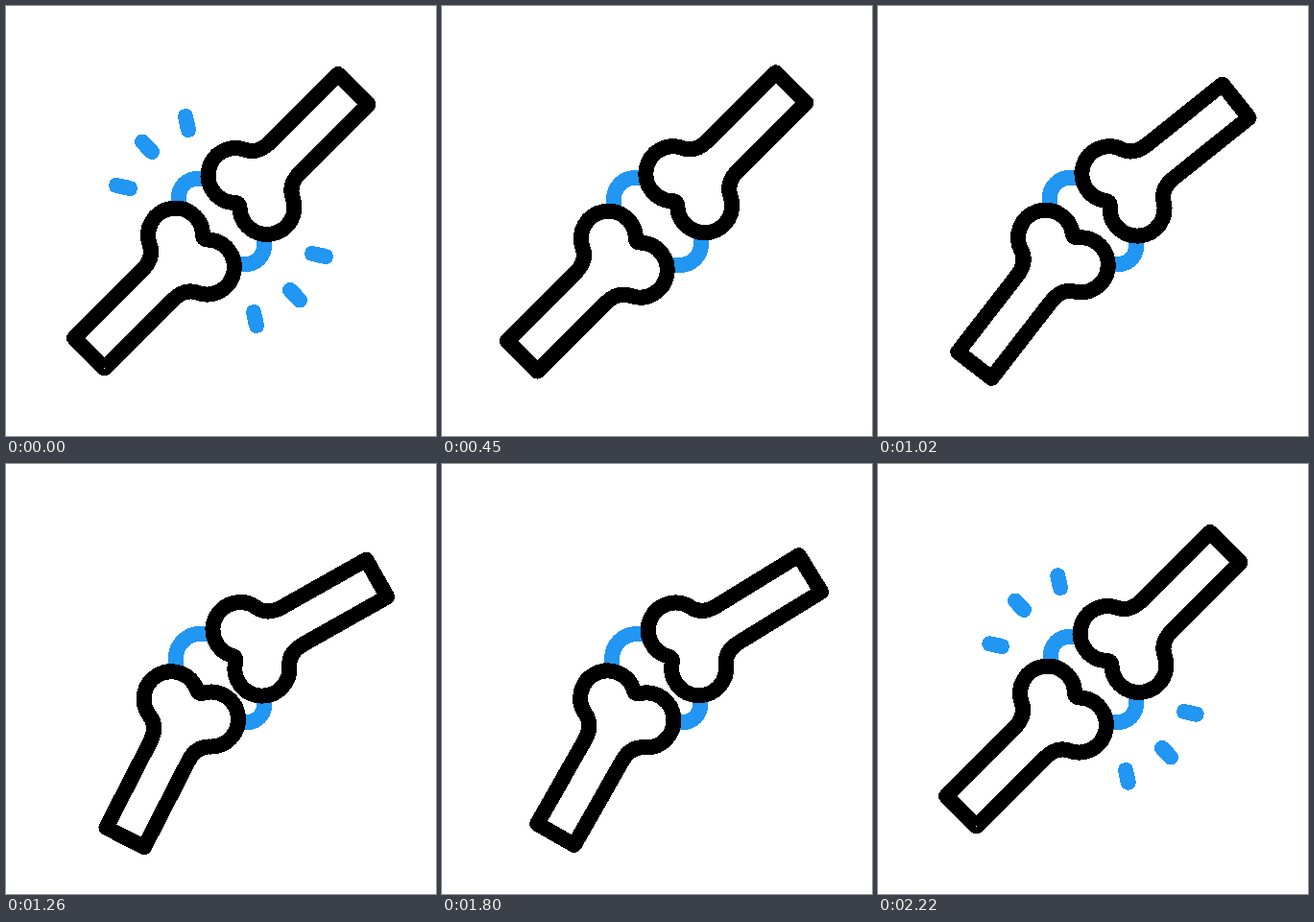
An HTML page that plays this animation: 448x448 px, repeating every 2250 ms.

```html
<!DOCTYPE html>
<html lang="en">
<head>
<meta charset="utf-8">
<title>Joint</title>
<style>
  html, body { margin: 0; width: 100%; height: 100%; overflow: hidden; background: #fff; }
  svg { display: block; width: 100%; height: 100%; shape-rendering: crispEdges; }
</style>
</head>
<body>
<svg viewBox="0 0 448 448">
  <defs>
    <path id="bone" d="M346 71 L275 142 C267 150 258.5 153.2 249 149.8 A28.5 28.5 0 1 0 238 205
      Q243.5 205 243.5 210.5 A28.5 28.5 0 1 0 298.7 199.5 C295.3 190 298.5 181.5 306.5 173.5 L377.5 102.5 Z"/>
    <path id="sparks"/>
  </defs>
  <g fill="none" stroke="#2196f3" stroke-width="16">
    <path id="cartilageA"/>
    <path id="cartilageB" transform="rotate(180 224.5 224.5)"/>
    <g stroke-linecap="round">
      <use href="#sparks"/>
      <use href="#sparks" transform="rotate(180 224 224)"/>
    </g>
  </g>
  <g fill="#fff" stroke="#000" stroke-width="16" stroke-linejoin="round">
    <use id="upper" href="#bone"/>
    <g transform="matrix(0 1 1 0 0 0)"><use id="lower" href="#bone"/></g>
  </g>
</svg>
<script>
const LOOP = 2250;
const SPARK_TIME = 150;
const SPARK_PEAKS = [0, 747, 1432, LOOP];
// Inner end, then outer end
const SPARKS = [[129, 190, 115, 187], [152, 152, 142, 141.5], [190, 129, 187, 115]];

const $ = id => document.getElementById(id);
const clamp = v => Math.min(1, Math.max(0, v));
const ease = p => (1 - Math.cos(Math.PI * clamp(p))) / 2;
const mix = (a, b, p) => a + (b - a) * p;

function track(keys, t) {
  const i = keys.findIndex(([time]) => time > t);
  if (i < 0) return keys[keys.length - 1][1];
  if (i === 0) return keys[0][1];
  const [t0, a] = keys[i - 1], [t1, b] = keys[i];
  return mix(a, b, ease((t - t0) / (t1 - t0)));
}

const makeBone = (id, open, press, bend, halfBend) => ({
  el: $(id),
  shift: [[0, 0], [225, open], [675, press], [870, 0]],
  angle: [[870, 0], [1220, bend], [1465, halfBend], [1670, bend], [2150, 0]]
});
const bones = [makeBone("upper", 9.5, -6, 16.2, 6.6), makeBone("lower", 11.5, -5.2, 18.5, 7.9)];

function drawCartilage(id, edge, r) {
  const c = edge + r;
  $(id).setAttribute("d", `M${edge} 228 V${c} A${r} ${r} 0 0 1 ${c} ${edge} H228`);
}

function drawSparks(t) {
  const peak = SPARK_PEAKS.find(p => Math.abs(t - p) < SPARK_TIME);
  let d = "";
  if (peak !== undefined) {
    const tip = ease((t - peak) / SPARK_TIME + 1);
    const tail = ease((t - peak) / SPARK_TIME);
    if (tip - tail > 0.01) {
      d = SPARKS.map(([x0, y0, x1, y1]) =>
        `M${mix(x0, x1, tail)} ${mix(y0, y1, tail)} L${mix(x0, x1, tip)} ${mix(y0, y1, tip)}`).join("");
    }
  }
  $("sparks").setAttribute("d", d);
}

function draw(t) {
  let shift = 0, angle = 0;
  for (const bone of bones) {
    const s = track(bone.shift, t), a = track(bone.angle, t);
    bone.el.setAttribute("transform", `translate(${s} ${-s}) rotate(${a} 256 192.5)`);
    shift += s / 2;
    angle += a / 2;
  }
  const edge = 180 - 0.4 * shift, r = 19 + 1.2 * shift;
  drawCartilage("cartilageA", edge - 0.2 * angle, r + 0.45 * angle);
  drawCartilage("cartilageB", edge, r - 0.1 * angle);
  drawSparks(t);
}

let start;
function tick(now) {
  start ??= now;
  draw((now - start) % LOOP);
  requestAnimationFrame(tick);
}
draw(0);
requestAnimationFrame(tick);
</script>
</body>
</html>
```
